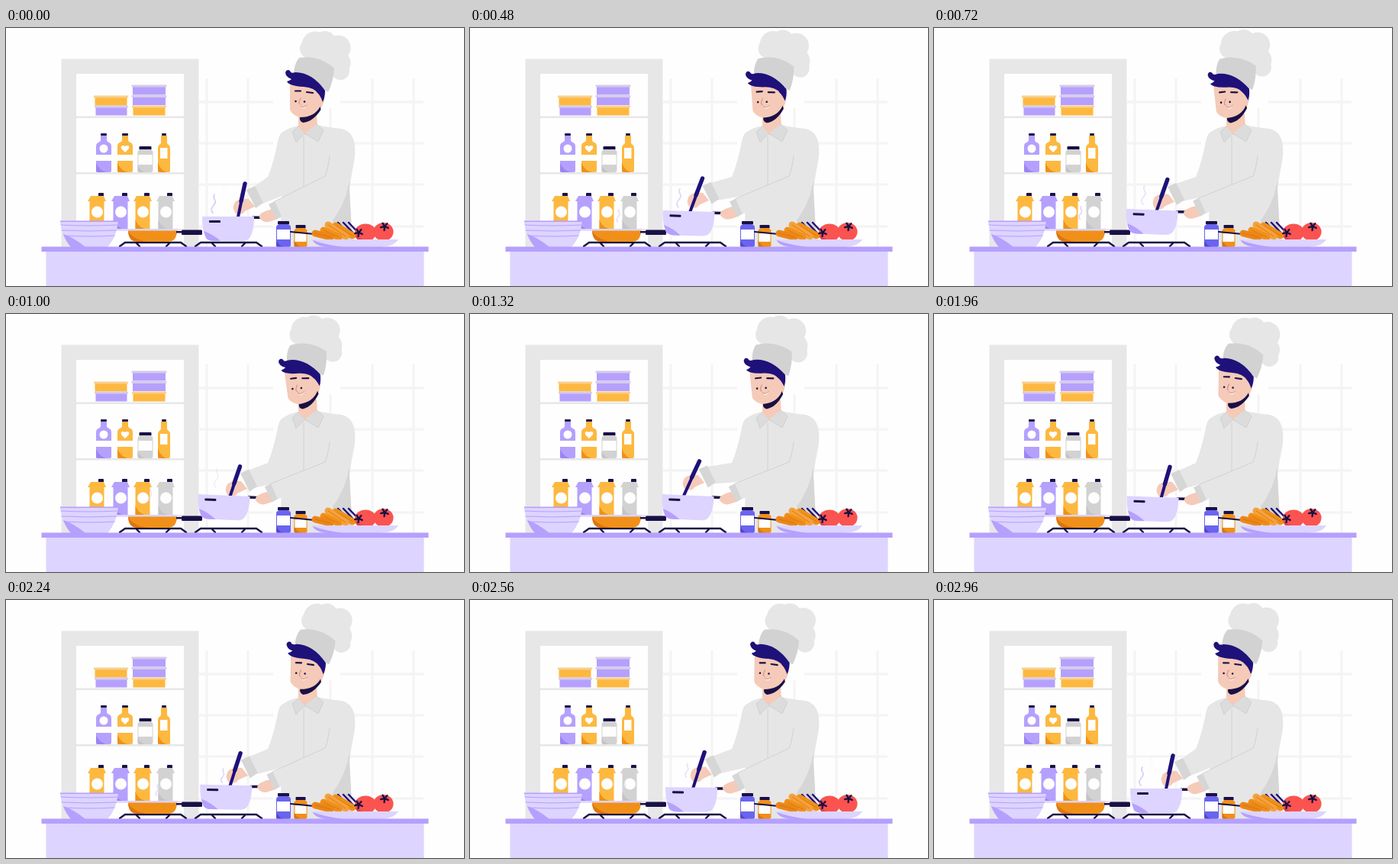
An HTML page for the animation above (3000 ms loop, 600 by 338 pixels).

```html
<!DOCTYPE html>
<html lang="en">
<head>
<meta charset="utf-8">
<title>Cooking chef</title>
<style>
html, body { margin: 0; width: 100%; height: 100%; overflow: hidden; background: #fefefe; }
svg { display: block; width: 100vw; height: 100vh; }
</style>
</head>
<body>
<svg id="stage" viewBox="0 0 600 338" preserveAspectRatio="none"></svg>
<script>
const LOOP = 3000, STEP = 40;
const C = {
  lilac: '#b5a0fd', pale: '#ddd4ff', lid: '#d6cbe8', orange: '#fdb840', amber: '#f09018',
  navy: '#1e1179', ink: '#191046', cloth: '#e6e6e6', cuff: '#d6d6d6', fold: '#cccccc',
  frame: '#e7e7e7', tile: '#f4f4f4', skin: '#f5cab8', white: '#fefefe', red: '#fa5350', blue: '#6a64ee'
};

const rect = (x, y, w, h, fill, rx = 0) => `<rect x="${x}" y="${y}" width="${w}" height="${h}" rx="${rx}" fill="${fill}"/>`;
const oval = (x, y, rx, ry, fill) => `<ellipse cx="${x}" cy="${y}" rx="${rx}" ry="${ry}" fill="${fill}"/>`;
const disc = (x, y, r, fill) => oval(x, y, r, r, fill);
const shape = (d, fill, id = '') => `<path id="${id}" d="${d}" fill="${fill}"/>`;
const line = (d, color, w, id = '') => `<path id="${id}" d="${d}" fill="none" stroke="${color}" stroke-width="${w}" stroke-linecap="round" stroke-linejoin="round"/>`;
const group = (id, ...parts) => `<g id="${id}">${parts.join('')}</g>`;

// Wall and shelves
function tiles() {
  const xs = [263, 317, 425, 480, 534].map(x => {
    const top = x === 425 ? 105 : 66;
    return rect(x - 1.5, top, 3, 287 - top, C.tile);
  });
  const ys = [97, 151, 205, 260].map(y =>
    rect(253, y - 1.5, 97, 3, C.tile) + rect(438, y - 1.5, 109, 3, C.tile));
  return [...xs, ...ys].join('');
}

function cabinet() {
  return rect(72.5, 40.5, 180, 246.5, C.frame) + rect(92, 60, 141, 227, C.white) +
    [115.5, 189, 263].map(y => rect(92, y, 141, 2.5, C.frame)).join('');
}

const tub = (x, y, w, fill, lid) => rect(x + 1.5, y + 2, w - 3, 11, fill) + rect(x, y, w, 3, lid, 1);

function bottle(x, fill, shade, label) {
  return shape(`M${x + 6} 141h8v6q0 2 3 3q3 1 3 5v32q0 2-2 2h-16q-2 0-2-2v-32q0-4 3-5q3-1 3-3z`, fill) +
    shape(`M${x} 177q4 9 13 12h-11q-2 0-2-2z`, shade) +
    rect(x + 6, 138, 8, 3, C.ink, 1) + label + rect(x, 166, 20, 8, C.white);
}

function bag(x, fill, shade) {
  return rect(x + 12, 216, 7, 4.5, C.ink, 1) +
    shape(`M${x + 2} 220h17l3 7h-2.500v36h-19v-36h-2.500z`, fill) +
    shape(`M${x + .5} 251q3 9 12 12h-12z`, shade) + disc(x + 10.5, 241, 7.5, C.white);
}

function jar(x, y, w, h, fill, shade, labelH) {
  return rect(x, y, w, h, fill, 3) + shape(`M${x} ${y + h - 9}q3 7 10 9h-8q-2 0-2-2z`, shade) +
    rect(x + 2, y - 5, w - 4, 4.5, C.ink, 1) + rect(x + 3, y - 1, w - 6, 2, fill) +
    rect(x + 1, y + 6, w - 2, labelH, C.white);
}

function goods() {
  const heart = shape('M156 163l-5-5q-1-4 2-4q2 0 3 1q1-1 3-1q3 0 2 4z', C.white);
  return tub(115, 88.5, 45, C.orange, '#f8d08e') + tub(116, 101.5, 44, C.lilac, C.lid) +
    tub(164.5, 74.5, 46, C.lilac, C.lid) + tub(164.5, 88, 46, C.lilac, C.lid) + tub(165, 101.5, 45, C.orange, '#f8d08e') +
    bottle(118, C.lilac, '#9a84f4', disc(128, 158, 5.5, C.white)) +
    bottle(146, C.orange, C.amber, heart) +
    jar(172.5, 160, 20, 29, '#d2d2d2', '#c4c4c4', 13) +
    shape('M203 141h8v9q0 2 2 3q2 1 2 4v30q0 2-2 2h-12q-2 0-2-2v-30q0-3 2-4q2-1 2-3z', C.orange) +
    shape('M199 176q3 10 11 13h-9q-2 0-2-2z', C.amber) +
    rect(204, 138, 6, 3, C.ink, 1) + rect(202, 157, 9.5, 14, C.white) +
    bag(109, C.orange, C.amber) + bag(140, C.lilac, '#9a84f4') + bag(169, C.orange, C.amber) + bag(199, '#d2d2d2', '#c4c4c4');
}

// Counter and the things on it
function bowl() {
  return shape('M71 253h76q-2 21-14 34h-48q-12-13-14-34z', C.pale) +
    shape('M75 270q13 4 29 17h-19q-7-8-10-17z', C.lilac) +
    [[258, 72], [265, 73], [272, 76]].map(([y, x]) => line(`M${x} ${y}q36 2 ${218 - 2 * x} 0`, C.lilac, 1)).join('') +
    rect(71, 252.5, 76, 1.6, C.lilac);
}

const burner = x => line(`M${x} 286l7-5h73l7 5M${x + 26} 286l-5-5M${x + 61} 286l5-5`, C.ink, 2.4);

function pan() {
  return shape('M160 265h64q0 14-11 15h-42q-11-1-11-15z', C.amber) +
    shape('M160 266q6 11 25 14h-14q-10-1-11-14z', '#dc7512') +
    rect(146, 263, 79, 2.5, C.pale, 1) + rect(223, 266, 9, 2.5, C.ink) + rect(230, 264.5, 27, 6.5, C.ink, 1.5);
}

function plate() {
  const stem = (x, y) => Array.from({ length: 5 }, (_, i) => {
    const a = i * 1.257 + .4;
    return line(`M${x} ${y}l${5 * Math.cos(a)} ${5 * Math.sin(a)}`, C.ink, 2.4);
  }).join('');
  const stick = (d, fill) => line(d, fill, 9) + line(d, '#d17410', .8);
  return line('M373 267L404 270', C.ink, 2) +
    [435, 442, 449].map(x => line(`M${x} 255l18 19`, C.navy, 2.5)).join('') +
    stick('M432 259l22 13', C.amber) + stick('M422 258l23 15', '#f6a13a') +
    stick('M416 265l20 9', C.amber) + stick('M405 269l20 5', '#ec8516') +
    oval(471, 268, 14, 11.5, C.red) + oval(494.5, 267, 13, 12, C.red) +
    shape('M458 272q8 6 17 6h-13q-4-2-4-6z', '#e33f47') +
    stem(462, 268) + stem(496, 260) +
    shape('M400 277h114q-5 9-23 10h-68q-18-1-23-10z', C.pale) +
    shape('M402 278q16 6 40 9h-19q-18-1-21-9z', C.lilac);
}

const counter = () => rect(52.5, 292, 495, 46, C.pale) + rect(46.5, 286.5, 507, 6.5, C.lilac);

// Chef
function torso() {
  return shape('M363 136Q371 130 384 128L408 127Q420 130 440 132Q452 135 456 148Q459 164 454 182L450 212L454 287H358Q361 240 362 205L357 146Q358 139 363 136Z', C.cloth) +
    shape('M450 198Q446 228 428 252V287H454L450 212Z', C.cuff) +
    line('M390 142V226', C.fold, .8) +
    shape('M383 112H407L408 132L392 140L383 133Z', C.skin) +
    shape('M383 129L375 136L380 150L391 138ZM407 126L416 134L409 149L391 138Z', '#dcdcdc') +
    line('M383 129L375 136L380 150L391 138L409 149L416 134L407 126', C.fold, .8);
}

function head() {
  const hat = [[398, 27, 13], [405, 22, 17.5], [418, 18, 14], [435, 26, 16.5], [435, 46, 16.5], [438, 56, 12], [417, 40, 22]];
  return hat.map(h => disc(...h, '#e6e6e6')).join('') +
    shape('M377 58Q378 46 384 39Q410 35 430 53Q429 70 422 84L400 70Z', '#d2d2d2') +
    shape('M372 68Q372 90 372 107Q374 113 384 117Q400 120 410 109Q417 100 417 90L406 74Z', C.skin) +
    shape('M366 58Q368 53 372 56Q373 60 379 58Q401 58 418 82Q418 91 415 97Q412 89 409 86Q404 78 390 77Q371 76 368 70Q372 69 374 67Q366 64 366 58Z', C.navy) +
    shape('M411.500 103Q404 117 385 117Q384 122 389 124Q402 123 412.500 107Z', C.ink) +
    line('M379 82.500L386 82.500M394 84L402 85', C.ink, 2.2) +
    disc(379.500, 96, 1.3, C.ink) + disc(391, 96.500, 1.3, C.ink) +
    line('M386 92Q382 99 385 100', '#c98c80', 1) +
    shape('M386 102Q389 105 394 101.500Q393 106 388 105Z', '#fff') +
    line('M386 102Q389 106 394 101.500', '#b8605c', .7);
}

const grip = () =>
  line('M5 -30L-9 38', C.navy, 4) + line('M5 -30L0 -7', C.navy, 5.4);

const fist = () =>
  shape('M318 224Q306 223 300 228Q296 235 299 240Q302 246 305 243Q310 245 313 240Q319 237 326 234Z', C.skin);

const potHand = () =>
  shape('M350 237Q340 239 334 243Q330 247 333 250Q337 255 344 254Q351 252 356 250Z', C.skin);

const pot = () =>
  rect(322, 246.5, 13, 3.5, C.ink, 1.5) +
  shape('M257 247H325Q325 267 319 275Q316 279 310 279H272Q265 279 262 275Q257 266 257 247Z', C.pale) +
  shape('M259 266Q271 270 281 279H272Q265 279 262 275Z', C.lilac) +
  rect(266, 252, 15, 3, C.ink, 1);

const wisp = id => line('M0 12Q-4 8 0 3Q5 -2 2 -6Q0 -9 2 -12', '#d9d0fb', 1.8, id);

const stage = document.getElementById('stage');
stage.innerHTML = [
  rect(0, 0, 600, 338, C.white), tiles(), cabinet(), goods(),
  torso(), group('head', head()),
  shape('', C.cloth, 'backArm'), group('fist', fist()), group('spoon', grip()),
  shape('M315 212L326 207L337 229L327 236Z', C.cuff, 'backCuff'),
  bowl(), burner(149), burner(248), pan(),
  group('pot', pot()),
  group('potHand', potHand(), shape('M344 231L354 226L363 246L354 251Z', C.cuff)),
  shape('', C.cloth, 'frontArm'), line('', C.fold, .8, 'crease'),
  jar(354, 258, 19, 29, C.blue, '#5148d0', 13), jar(377.5, 263, 17, 24, C.amber, '#d87512', 11),
  plate(), counter(),
  ['steamA', 'steamB', 'steamC', 'steamD'].map(id => wisp(id)).join('')
].join('');

// Tracks: time, then values
const headTrack = [[0, 0], [480, -4.2], [1000, -7.6], [1320, -6.2], [1640, -.8], [1800, .7], [2240, 1.2], [2700, .6]];
const potTrack = [[0, 0, 0], [480, -4.8, -7], [1000, -6, -9.5], [1640, -6, -9.5], [2240, -3, -4.5], [2840, 0, 0]];
const handTrack = [[0, 0, 0], [320, -16, -9], [480, -13, -8], [1000, -10, -5], [1320, -19, -13], [1640, -12, -7],
  [2000, -6, -4], [2240, -9, -4], [2400, -14, -7], [2640, -6, -4], [2960, 0, 0]];

// Periodic smooth interpolation through the keys
function sample(track, t) {
  const n = track.length;
  const key = i => {
    const turn = Math.floor(i / n), [time, ...v] = track[i - turn * n];
    return { time: time + turn * LOOP, v };
  };
  let i = n - 1;
  while (track[i][0] > t) i--;
  const [a, b, c, d] = [-1, 0, 1, 2].map(k => key(i + k));
  const span = c.time - b.time, u = (t - b.time) / span;
  return b.v.map((p, k) => {
    const q = c.v[k];
    const slope = (lo, mid, hi) => (mid.v[k] - lo.v[k]) * (hi.v[k] - mid.v[k]) <= 0 ? 0
      : (hi.v[k] - lo.v[k]) / (hi.time - lo.time) * span;
    const m0 = slope(a, b, c), m1 = slope(b, c, d);
    return p + u * m0 + u * u * (3 * (q - p) - 2 * m0 - m1) + u * u * u * (2 * (p - q) + m0 + m1);
  });
}

const el = id => document.getElementById(id);
const put = (id, name, value) => el(id).setAttribute(name, value);

function steam(id, t, start, life, x, y, rise, drift, scale) {
  const p = ((t - start + LOOP) % LOOP) / life;
  put(id, 'opacity', p < 1 ? Math.min(1, p * 6, (1 - p) * 1.6) : 0);
  put(id, 'transform', `translate(${x + drift * p} ${y - rise * p}) scale(${scale})`);
}

function draw(t) {
  const [turn] = sample(headTrack, t), [px, py] = sample(potTrack, t), [hx, hy] = sample(handTrack, t);
  put('head', 'transform', `rotate(${turn} 393 128)`);
  put('pot', 'transform', `translate(${px} ${py}) rotate(${-py * .25} 291 262)`);
  put('fist', 'transform', `translate(${hx} ${hy})`);
  put('spoon', 'transform', `translate(${308 + hx} ${234 + hy}) rotate(${-.67 * hx})`);

  const cx = hx * .8, cy = hy * .65;
  put('backCuff', 'transform', `translate(${cx} ${cy})`);
  put('backArm', 'd', `M363 136Q357 140 355 154Q350 178 343 195L${323 + cx} ${209 + cy}L${334 + cx} ${231 + cy}L364 219L372 150Z`);

  const ax = px * .85, ay = py * .5;
  put('potHand', 'transform', `translate(${ax} ${ay})`);
  put('frontArm', 'd', `M424 168Q440 150 456 150Q459 164 455 180Q451 204 444 213Q436 220 ${361 + ax} ${247 + ay}L${352 + ax} ${227 + ay}L418 194Z`);
  put('crease', 'd', `M424 168Q422 184 418 194L${352 + ax} ${227 + ay}`);

  steam('steamA', t, 2700, 1600, 270, 235, 25, 6, 1);
  steam('steamB', t, 2000, 1050, 283, 235, 22, 1, .75);
  steam('steamC', t, 350, 1000, 195, 248, 16, -10, .7);
  steam('steamD', t, 2050, 900, 195, 252, 14, 12, .6);
}

function tick() {
  draw(Math.floor(performance.now() % LOOP / STEP) * STEP);
  requestAnimationFrame(tick);
}
tick();
</script>
</body>
</html>
```
